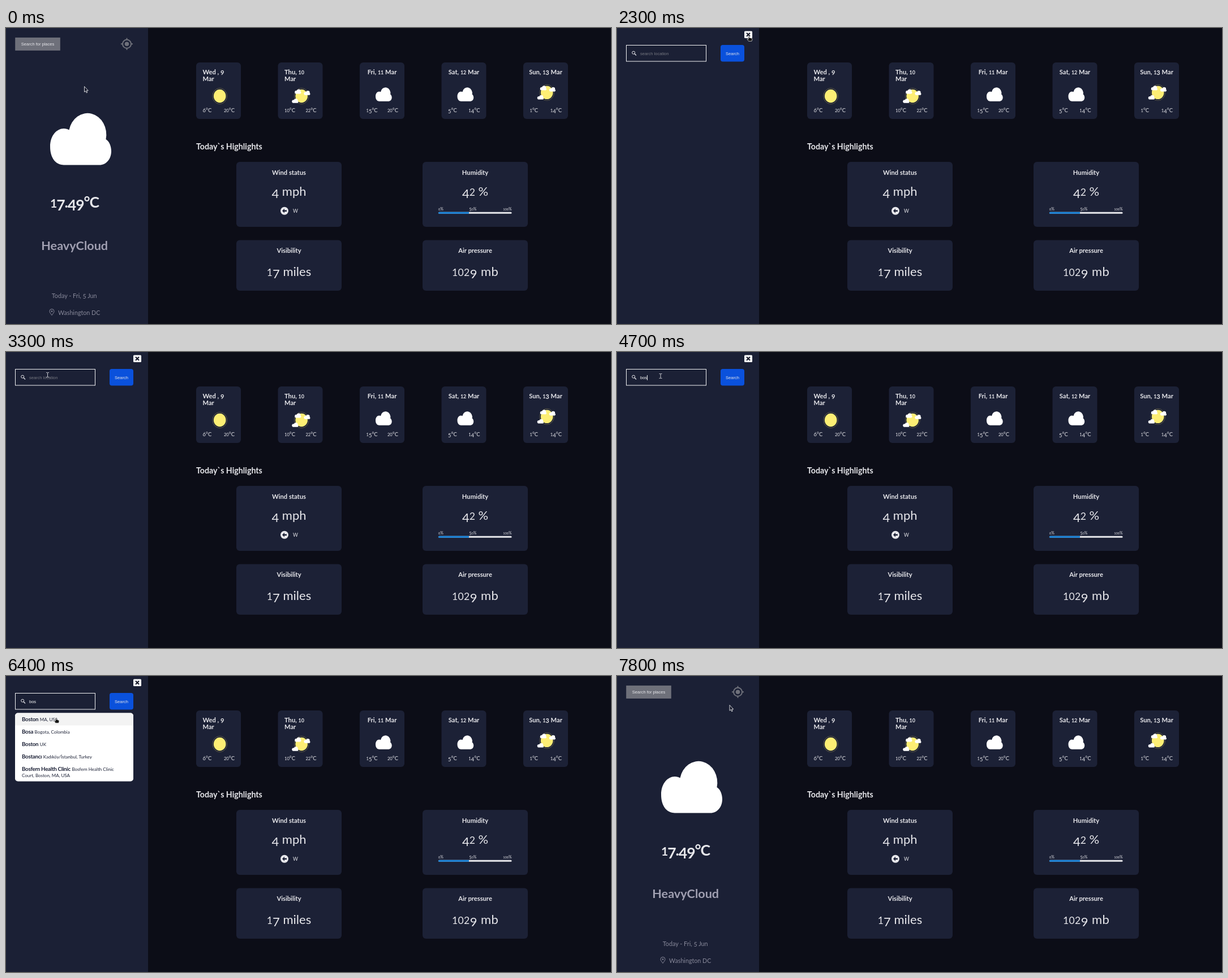
Recreate the animation shown at these times as an HTML page. Size 1069 px wide and 524 px high, loop 8 s.

```html
<!DOCTYPE html>
<html lang="en">
<head>
<meta charset="utf-8">
<title>Weather</title>
<style>
html, body { margin: 0; width: 100%; height: 100%; overflow: hidden; background: #0c0d17; }
svg { display: block; width: 100%; height: 100%; }
text { font-family: Lato, sans-serif; fill: #e7e7eb; }
.ui { font-family: "Liberation Sans", Arial, sans-serif; }
.bold { font-weight: 700; }
.tight { font-weight: 700; letter-spacing: -.3px; }
</style>
</head>
<body>
<svg id="stage" viewBox="0 0 1069 524">
  <defs>
    <path id="cloud" d="M20 91C8 89 0 77 0 59C0 39 12 27 24 27C28 27 31 28 33.500 29.500A32.500 37 0 0 1 98.500 46C105 50 108 59 108 67C108 81 99 91.500 87 91.500H24Z" fill="#fff"/>
    <g id="sun">
      <ellipse rx="12.800" ry="14" fill="none" stroke="#77714e" stroke-width=".7"/>
      <ellipse rx="10.800" ry="11.800" fill="#fdee74"/>
    </g>
    <g id="lightCloud">
      <use href="#sun"/>
      <use href="#cloud" transform="translate(-12 -12) scale(.105 .087)"/>
      <use href="#cloud" transform="translate(4.200 -9.500) scale(.103 .085)"/>
      <use href="#cloud" transform="translate(-17 4.500) scale(.105 .084)"/>
    </g>
    <g id="arrow">
      <path d="M0 0V9.800L2.200 7.900 3.700 11.300 5.200 10.600 3.800 7.300H6.700Z" fill="#15182a" stroke="#fff" stroke-width=".8"/>
    </g>
    <g id="hand">
      <path d="M-.8 .4Q0-.6 .8 .4V3.200Q2 2.600 2.600 3.600 4 3.200 4.300 4.200 5.800 4 5.800 5.400V7L5 9.300H-.5L-3.200 5.600Q-2.500 4.500-.8 6Z" fill="#111" stroke="#eee" stroke-width=".7"/>
    </g>
    <g id="beam" fill="none" stroke="#c9cad0" stroke-width="1">
      <path d="M-2.500-4H-.6L0-3.500 .6-4H2.500M0-3.500V3.500M-2.500 4H-.6L0 3.500 .6 4H2.500"/>
    </g>
  </defs>
  <g id="dashboard"></g>
  <rect width="251" height="524" fill="#1b2035"/>
  <g id="today"></g>
  <g id="search"></g>
  <use id="pointer"/>
</svg>
<script>
const LOOP = 8000, CARD = '#1c2136', GREY = '#6e707a', MUTED = '#88899a', LIGHT = '#e7e7eb';
const $ = id => document.getElementById(id);

// Text figures: 0-2 near x-height, 3 4 5 7 9 below the baseline.
function figures(s, size) {
  let low = 0;
  return s.replace(/[012]+|[34579]+|[^01234579]+/g, part => {
    const drop = /[34579]/.test(part) ? size * .17 : 0;
    const dy = drop - low;
    low = drop;
    return `<tspan dy="${dy}" font-size="${/[012]/.test(part) ? size * .8 : size}">${part}</tspan>`;
  });
}
const text = (x, y, s, size, { anchor = 'start', cls = '', fill = LIGHT, spacing = 0 } = {}) =>
  `<text x="${x}" y="${y}" font-size="${size}" text-anchor="${anchor}" class="${cls}" style="fill:${fill};${
    spacing ? `letter-spacing:${spacing}px` : ''}">${cls === 'ui' ? s : figures(s, size)}</text>`;
const mid = (x, y, s, size, options) => text(x, y, s, size, { anchor: 'middle', ...options });
const box = (x, y, w, h, fill, r = 0, extra = '') =>
  `<rect x="${x}" y="${y}" width="${w}" height="${h}" rx="${r}" fill="${fill}" ${extra}/>`;
const icon = (id, x, y, scale = 1) => `<use href="#${id}" transform="translate(${x} ${y}) scale(${scale})"/>`;

const days = [
  ['Wed , 9|Mar', 'sun', '6°C', '20°C'],
  ['Thu, 10|Mar', 'lightCloud', '10°C', '22°C'],
  ['Fri, 11 Mar', 'cloud', '15°C', '20°C'],
  ['Sat, 12 Mar', 'cloud', '5°C', '14°C'],
  ['Sun, 13 Mar', 'lightCloud', '1°C', '14°C'],
];
const forecast = days.map(([date, kind, low, high], i) => {
  const x = 336 + i * 144.5, lines = date.split('|');
  const label = lines.length > 1
    ? lines.map((line, n) => text(x + 11.5, 81.5 + n * 12.5, line, 11.2, { cls: 'bold' })).join('')
    : mid(x + 39.5, 81.5, date, 11.2, { cls: 'bold' });
  const picture = kind === 'cloud' ? icon(kind, x + 28, 105.3, .266)
    : icon(kind, x + 41.7, i === 4 ? 114.3 : 120.5);
  return box(x, 61, 79, 100, CARD, 6) + label + picture
    + text(x + 11.5, 149, low, 9.5) + text(x + 68, 149, high, 9.5, { anchor: 'end' });
}).join('');

const highlight = (x, y, h, title, value, valueY, spacing) =>
  box(x, y, 186, h, CARD, 6) + mid(x + 93, y + 22.5, title, 11.2, { cls: 'bold' })
  + mid(x + 93, valueY, value, 22, { spacing });

$('dashboard').innerHTML = forecast
  + text(336, 215, 'Today`s Highlights', 14.2, { cls: 'bold' })
  + highlight(407, 237, 115, 'Wind status', '4 mph', 297)
  + highlight(736, 237, 115, 'Humidity', '42 %', 297)
  + highlight(407, 375.5, 89.5, 'Visibility', '17 miles', 439)
  + highlight(736, 375.5, 89.5, 'Air pressure', '1029 mb', 439, .4)
  + `<circle cx="492" cy="323.700" r="7" fill="${LIGHT}"/>
     <path d="M488 323.700L492 319.800V322.500H496V325H492V327.600Z" fill="${CARD}"/>`
  + text(507, 327, 'W', 8.6)
  + text(764, 322.5, '0%', 7) + text(818.5, 322.5, '50%', 7) + text(893.5, 322.5, '100%', 7, { anchor: 'end' })
  + box(764, 325.8, 129.5, 3, LIGHT, 1.5)
  + '<path d="M818 325.800H765.500a1.500 1.500 0 0 0 0 3H818Z" fill="#137fd6"/>';

$('today').innerHTML = box(16.2, 16.9, 79.6, 23, GREY)
  + `<g id="ring">${box(15.4, 16, 81.3, 24.8, 'none', 1.5, 'stroke="#e4e4e6" stroke-width=".8"')
    + box(16.4, 17, 79.3, 22.8, 'none', 0, 'stroke="#15171f" stroke-width="1.1"')}</g>`
  + mid(56, 31, 'Search for places', 7.5, { cls: 'ui' })
  + `<g transform="translate(213.500 28.300)" fill="none" stroke="${GREY}" stroke-width="2">
      <circle r="7.500"/><circle r="3.800" fill="${GREY}" stroke="none"/>
      <path d="M0-10.500V-7M0 10.500V7M-10.500 0H-7M10.500 0H7"/></g>`
  + icon('cloud', 78, 151)
  + mid(121, 318, '17.49°C', 26.6, { cls: 'bold', spacing: -1.1 })
  + mid(121.2, 392.5, 'HeavyCloud', 21.6, { cls: 'bold', fill: '#a09fb1' })
  + mid(120.7, 477.5, 'Today - Fri, 5 Jun', 10.8, { fill: MUTED })
  + `<path d="M81 508.500C78.500 505 77 503.200 77 501.500a4 4 0 0 1 8 0C85 503.200 83.500 505 81 508.500Z" fill="none" stroke="${MUTED}"/>
     <circle cx="81" cy="501.500" r="1.300" fill="${MUTED}"/>`
  + text(92, 507.5, 'Washington DC', 10.7, { fill: MUTED });

$('search').innerHTML = box(225, 5.5, 14, 12.5, '#fff', 1.5)
  + '<path d="M229 8.800L235 14.800M235 8.800L229 14.800" stroke="#15182a" stroke-width="2.200"/>'
  + box(16.5, 30.5, 141, 28.5, 'none', 0, 'stroke="#f2f2f4"')
  + '<g fill="none" stroke="#e7e7eb"><circle cx="29.200" cy="43.700" r="2.500"/><path d="M31 45.500L34 48.500" stroke-width="1.300"/></g>'
  + box(183, 30, 42, 29.5, '#0a51dc', 4) + mid(204, 47.7, 'Search', 7.5, { cls: 'ui' })
  + '<g id="query"></g><g id="results"></g>';

const firstResults = [
  ['Bogota', 'Colombia'], ['Boston', 'MA, USA'], ['Bologna', 'Italy'],
  ['Bordeaux', 'France'], ['Bodrum', 'Muğla, Turkey'],
];
const finalResults = [
  ['Boston', 'MA, USA'], ['Bosa', 'Bogota, Colombia'], ['Boston', 'UK'],
  ['Bostancı', 'Kadıköy/İstanbul, Turkey'],
  ['Bosfern Health Clinic', 'Bosfern Health Clinic', 'Court, Boston, MA, USA'],
];
function resultList(rows, hovered) {
  const height = rows[4][2] ? 121 : 110;
  return box(16, 65.5, 209, height, '#fff', 5)
    + (hovered ? '<path d="M16 87.500V70.500a5 5 0 0 1 5-5H220a5 5 0 0 1 5 5V87.500Z" fill="#f3f3f3"/>' : '')
    + rows.map(([name, place, rest], i) => {
      const y = 80 + i * 22;
      return `<text x="28" y="${y}" style="fill:#1b2035"><tspan class="tight" font-size="9.800">${name}</tspan>`
        + `<tspan dx="2.500" font-size="8">${place}</tspan></text>`
        + (rest ? text(28, y + 10.5, rest, 8, { fill: '#1b2035' }) : '');
    }).join('');
}

// Pointer stops: time, x, y
const path = [
  [0, 138.5, 103.5], [500, 138.5, 103.5], [700, 130.5, 102.5], [800, 130.5, 102.5],
  [1300, 61, 36], [1400, 61, 34], [1700, 120.5, 44], [2300, 233, 14], [2700, 233, 14],
  [3100, 71, 37], [3200, 71, 37], [3300, 73.5, 40.5], [3600, 77, 42.5], [5700, 77, 42.5],
  [5800, 60, 47], [5900, 42, 54], [6000, 88, 74], [6400, 88, 74], [7000, 205, 45],
  [7100, 205, 45], [7500, 199, 49.5], [7600, 199, 49.5], [7800, 199, 51.5], [LOOP, 199, 51.5],
];
function pointerAt(t) {
  const i = path.findIndex(stop => stop[0] > t);
  const [t0, x0, y0] = path[i - 1], [t1, x1, y1] = path[i];
  const k = (t - t0) / (t1 - t0);
  return [x0 + (x1 - x0) * k, y0 + (y1 - y0) * k];
}
function pointerShape(x, y, searching, listed) {
  const inside = (l, t, r, b) => x >= l && x <= r && y >= t && y <= b;
  if (!searching) return inside(16, 17, 96, 40) || inside(203, 18, 224, 39) ? 'hand' : 'arrow';
  if (inside(16, 30, 158, 59)) return 'beam';
  return inside(183, 30, 225, 59) || inside(225, 5, 239, 18) || listed && inside(16, 65, 225, 187)
    ? 'hand' : 'arrow';
}
const show = (id, on) => $(id).setAttribute('display', on ? 'inline' : 'none');

function draw(t) {
  const between = (a, b) => t >= a && t < b;
  const searching = between(1500, 2600) || between(3300, 7300);
  const listed = between(4800, 6500);
  show('today', !searching);
  show('search', searching);
  show('ring', between(1400, 1500) || between(3100, 3300));

  const typed = between(4300, 4700) ? 'bo' : between(4700, 6500) ? 'bos' : between(6500, 7300) ? 'Boston, MA, USA' : '';
  const caretX = 41.5 + typed.length * 4;
  $('query').innerHTML = text(41, 47.6, typed || 'search location', 7.5, { cls: 'ui', fill: typed ? '#fff' : '#757780' })
    + (between(4100, 5200) ? box(caretX - .4, 41, .9, 9, '#fff') : '');
  $('results').innerHTML = listed
    ? resultList(t < 5200 ? firstResults : finalResults, t >= 6400) : '';

  const [x, y] = pointerAt(t);
  $('pointer').setAttribute('href', '#' + pointerShape(x, y, searching, listed));
  $('pointer').setAttribute('transform', `translate(${x} ${y})`);
}

let last = -1;
function frame() {
  const t = Math.floor(performance.now() % LOOP / 100) * 100;
  if (t !== last) draw(last = t);
  requestAnimationFrame(frame);
}
frame();
</script>
</body>
</html>
```
